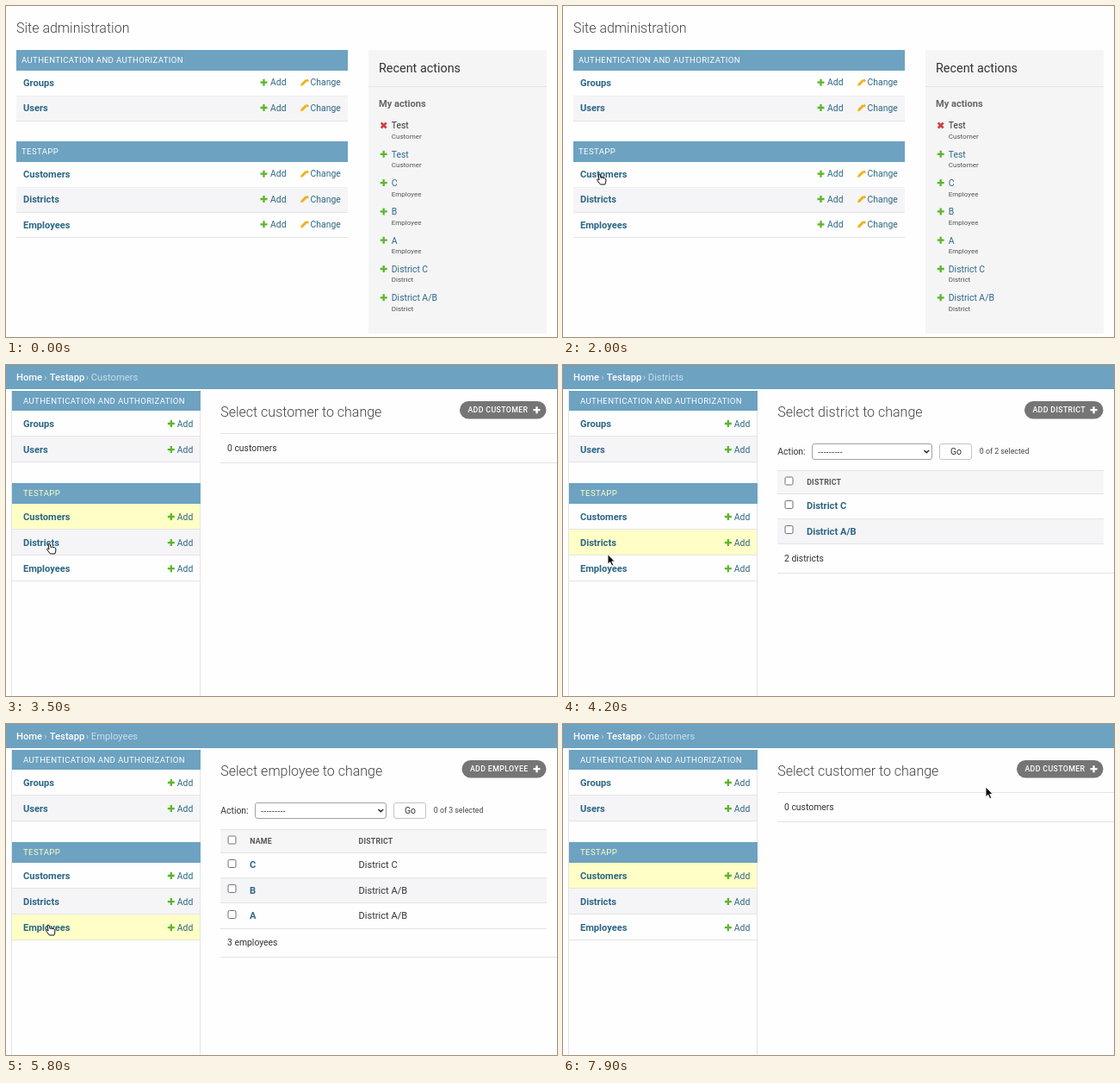
An HTML page that plays this animation: 640 by 384 pixels, repeating every 8000 ms.

```html
<!DOCTYPE html>
<html lang="en">
<head>
<meta charset="utf-8">
<title>Site administration</title>
<style>
  html, body { margin: 0; width: 100%; height: 100%; overflow: hidden; background: #fefefe; }
  svg { display: block; width: 640px; height: 384px; font-family: Roboto, "Liberation Sans", sans-serif; }
  text { white-space: pre; }
  .title { font-size: 16px; font-weight: 300; fill: #444; }
  .caption { font-size: 9.6px; letter-spacing: .35px; fill: #fff; }
  .current { fill: #ffffc8; }
  .name { font-size: 11.1px; font-weight: 700; fill: #2c6585; }
  .link { font-size: 10.4px; fill: #2f6885; }
  .body { font-size: 10.4px; fill: #333; }
  .cell { font-size: 11.1px; fill: #333; }
  .small { font-size: 8.8px; fill: #444; }
  .tiny { font-size: 8px; fill: #555; }
  .head { font-size: 8.8px; font-weight: 700; letter-spacing: .2px; fill: #555; }
  .tool { font-size: 8.8px; font-weight: 500; letter-spacing: .35px; fill: #fff; }
  .module { font-size: 14.4px; fill: #333; }
  .sub { font-size: 11.1px; font-weight: 700; fill: #666; }
  .crumb { font-size: 11.2px; fill: #c8e0ec; }
  .home { font-weight: 500; fill: #fff; }
  .dashes { font: 9.6px "Liberation Sans", sans-serif; fill: #222; }
</style>
</head>
<body>
<svg id="stage" viewBox="0 0 640 384"></svg>
<script>
const BLUE = '#6da2c1', STRIPE = '#f5f5f7', LINE = '#e4e4e6', GREEN = '#5db52c', CURRENT = '#fefec6';
const LOOP = 8000;

const text = (x, y, cls, str, extra = '') => `<text x="${x}" y="${y}" class="${cls}" ${extra}>${str}</text>`;
const rect = (x, y, w, h, fill, extra = '') =>
  `<rect x="${x}" y="${y}" width="${w}" height="${h}" fill="${fill}" ${extra}/>`;
const rule = (x1, x2, y) => rect(x1, y, x2 - x1, 1, LINE);
const plus = (x, y, color = GREEN) =>
  `<path d="M${x - 4} ${y}h8M${x} ${y - 4}v8" stroke="${color}" stroke-width="2.3"/>`;
const cross = (x, y) =>
  `<path d="M${x - 3} ${y - 3}l6 6m0 -6l-6 6" stroke="#cf3d3d" stroke-width="2.5"/>`;
const pencil = (x, y) =>
  `<path d="M${x - 4} ${y + 4}l.8 -3 5 -5 2.2 2.2 -5 5zM${x + 2.3} ${y - 2.9}l1 -1q.6 -.5 1.2 0l1 1q.5 .6 0 1.2l-1 1z" fill="#efb41c"/>`;

const apps = [
  ['AUTHENTICATION AND AUTHORIZATION', ['Groups', 'Users']],
  ['TESTAPP', ['Customers', 'Districts', 'Employees']],
];

function indexPage() {
  let out = text(12, 31, 'title', 'Site administration');
  apps.forEach(([caption, models], a) => {
    const top = a ? 157 : 51;
    out += rect(12, top, 385, 24, BLUE) + text(18, top + 15.2, 'caption', caption);
    models.forEach((model, i) => {
      const y = top + 24 + i * 29.3, mid = y + 13.9;
      if (i % 2) out += rect(12, y, 385, 29, STRIPE);
      out += rule(12, 397, Math.round(y + 28.5))
        + text(20, mid + 4, 'name', model)
        + plus(299.5, mid - .2) + text(307, mid + 3.4, 'link', 'Add')
        + pencil(346, mid) + text(353.6, mid + 3.4, 'link', 'Change');
    });
  });
  out += rect(421, 51, 207, 329, '#f5f5f6') + rule(421, 628, 93)
    + text(433, 77, 'module', 'Recent actions') + text(433, 117, 'sub', 'My actions');
  const actions = [['Test', 'Customer'], ['Test', 'Customer'], ['C', 'Employee'], ['B', 'Employee'],
    ['A', 'Employee'], ['District C', 'District'], ['District A/B', 'District']];
  actions.forEach(([label, kind], i) => {
    const y = 138.5 + i * 33.3;
    out += (i ? plus : cross)(438.7, y)
      + text(447.8, y + 3.8, i ? 'link' : 'body', label)
      + text(447.8, y + 15.4, 'tiny', kind);
  });
  return out;
}

function sidebar(current) {
  let out = rect(6, 29, 1, 355, LINE) + rect(225, 29, 1, 355, LINE);
  apps.forEach(([caption, models], a) => {
    const top = a ? 137 : 30;
    out += rect(7, top, 219, a ? 24 : 23, BLUE)
      + text(20, a ? 152.4 : 44.7, a ? 'caption current' : 'caption', caption);
    models.forEach((model, i) => {
      const y = (a ? 161 : 53) + i * 30.1, mid = y + 14.8;
      const fill = model === current ? CURRENT : i % 2 ? STRIPE : '#fefefe';
      out += rect(7, y, 218, 30, fill) + rule(7, 225, Math.round(y + 29))
        + text(20, mid + 3.9, 'name', model)
        + plus(191.8, mid + .2) + text(198.8, mid + 3.8, 'link', 'Add');
    });
  });
  return out;
}

const checkbox = y => rect(258, y - 4.5, 9, 9, '#fff', 'rx="1.5" stroke="#707070"');

function table({ one, many, columns, rows, selectWidth }) {
  const right = 289 + selectWidth, bottom = 149 + rows.length * 29.3;
  let out = text(249.3, 104, 'body', 'Action:')
    + rect(289.5, 91.5, selectWidth - 1, 18, '#fff', 'rx="2.5" stroke="#a2a2a2"')
    + text(296, 103.5, 'dashes', '---------')
    + `<path d="M${right - 9.5} 99l2.8 2.8 2.8 -2.8" fill="none" stroke="#222" stroke-width="1.5"/>`
    + rect(right + 8.5, 91.5, 37, 18, '#fefefe', 'rx="2.5" stroke="#c4c4c4"')
    + text(right + 27.5, 104.3, 'body', 'Go', 'text-anchor="middle"')
    + text(right + 54.8, 103.3, 'small', `0 of ${rows.length} selected`)
    + rect(249, 122, 379, 28, '#f6f6f7') + rule(249, 628, 122) + rule(249, 628, 149)
    + checkbox(134.5);
  columns.forEach((label, i) => out += text(283.2 + i * 126.3, 139, 'head', label));
  rows.forEach((cells, i) => {
    const y = 149.5 + i * 29.3;
    if (i % 2) out += rect(249, y, 379, 29, STRIPE);
    out += rule(249, 628, Math.round(y + 28.5)) + checkbox(Math.round(y + 12.5));
    cells.forEach((cell, c) => out += text(283 + c * 126.5, y + 17.9, c ? 'cell' : 'name', cell));
  });
  return out + text(257, bottom + 20.5, 'body', `${rows.length} ${many}`)
    + rule(249, 640, Math.round(bottom + 33.5));
}

function listPage(list) {
  const { one, many, buttonX, rows } = list;
  const label = many[0].toUpperCase() + many.slice(1);
  let out = rect(0, 0, 640, 28, BLUE)
    + text(12, 18.3, 'crumb home', 'Home') + text(44.3, 18.3, 'crumb', '›')
    + text(50.8, 18.3, 'crumb home', 'Testapp') + text(92.8, 18.3, 'crumb', '›')
    + text(98.8, 18.3, 'crumb', label)
    + sidebar(label)
    + text(249.2, 59.5, 'title', `Select ${one} to change`)
    + rect(buttonX, 42, 627.5 - buttonX, 20.5, '#757575', 'rx="10.2"')
    + text(buttonX + 9.4, 55.2, 'tool', `ADD ${one.toUpperCase()}`) + plus(616.5, 52.2, '#fff');
  return out + (rows ? table(list)
    : rule(249, 640, 79) + text(257, 100.2, 'body', `0 ${many}`) + rule(249, 640, 113));
}

const customers = listPage({ one: 'customer', many: 'customers', buttonX: 527 });
const districts = listPage({
  one: 'district', many: 'districts', buttonX: 536, selectWidth: 140,
  columns: ['DISTRICT'], rows: [['District C'], ['District A/B']],
});
const employees = listPage({
  one: 'employee', many: 'employees', buttonX: 529.5, selectWidth: 153,
  columns: ['NAME', 'DISTRICT'],
  rows: [['C', 'District C'], ['B', 'District A/B'], ['A', 'District A/B']],
});

const pages = [[0, indexPage()], [2100, customers], [3900, districts], [4900, employees], [7500, customers]];

// Pointer path: time, x, y
const path = [
  [900, 52, 238], [1400, 38, 201], [1700, 42, 195], [2200, 42, 195], [2600, 106, 183], [2800, 106, 183],
  [3500, 50, 207], [3950, 50, 207], [4200, 52, 219.5], [4500, 49, 233], [6400, 49, 233],
  [6900, 39, 216.5], [7200, 40, 176], [7500, 40, 176], [7900, 491, 73], [8000, 491, 73],
];

const stage = document.getElementById('stage');
stage.innerHTML = pages.map(([, markup]) => `<g class="page">${markup}</g>`).join('') + `
  <g id="pointer" stroke-linejoin="round">
    <path id="arrow" d="M0 0V11.6L2.7 9.2 4.7 13.6 6.8 12.7 4.8 8.4H8.3Z" fill="#111" stroke="#fff" stroke-width=".9"/>
    <path id="hand" d="M-1 .6Q0 -.6 1 .6L2 4.4 3.6 4 5 4.6 6.4 4.6 7.8 5.8V9L6.8 12H1.4L-1.6 8.2Q-3.4 5.8 -1.4 5.8L0 7Z" fill="#fff" stroke="#111"/>
  </g>`;
const groups = [...stage.querySelectorAll('.page')];
const [pointer, arrow, hand] = ['pointer', 'arrow', 'hand'].map(id => document.getElementById(id));
const show = (el, on) => el.setAttribute('visibility', on ? 'visible' : 'hidden');

function pointerAt(t) {
  const i = Math.max(1, path.findIndex(([time]) => time > t));
  const [t0, x0, y0] = path[i - 1], [t1, x1, y1] = path[i];
  const p = Math.min(1, Math.max(0, (t - t0) / (t1 - t0))), e = p * p * (3 - 2 * p);
  return [x0 + (x1 - x0) * e, y0 + (y1 - y0) * e];
}

function draw(t) {
  const page = pages.filter(([start]) => t >= start).length - 1;
  groups.forEach((g, i) => g.setAttribute('display', i === page ? 'inline' : 'none'));
  const [x, y] = pointerAt(t), visible = t >= path[0][0];
  const rows = page ? [68, 98, 176, 206, 236] : [89, 118, 195, 224.5, 254];
  const overLink = x >= 20 && x <= 74 && rows.some(row => Math.abs(y - row) < 5.5);
  pointer.setAttribute('transform', `translate(${x} ${y})`);
  show(arrow, visible && !overLink);
  show(hand, visible && overLink);
}

const start = performance.now();
function tick() {
  draw((performance.now() - start) % LOOP);
  requestAnimationFrame(tick);
}
tick();
</script>
</body>
</html>
```
